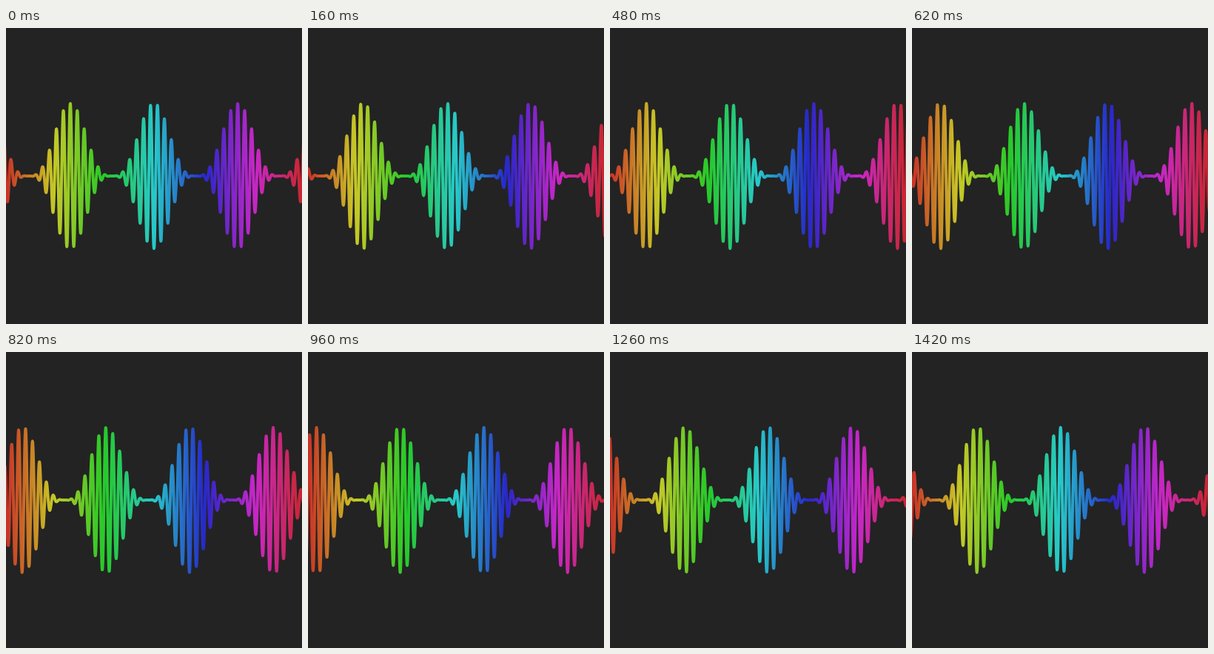
An HTML page with a canvas that plays this animation: 400 px wide and 400 px high, repeating every 1440 ms.

```html
<!DOCTYPE html>
<html lang="en">
<head>
<meta charset="utf-8">
<title>Rainbow wave packets</title>
<style>
  html, body { margin: 0; width: 100%; height: 100%; overflow: hidden; background: #232323; }
  canvas { display: block; width: 400px; height: 400px; }
</style>
</head>
<body>
<canvas id="stage" width="400" height="400"></canvas>
<script>
const SIZE = 400, MID = SIZE / 2;
const LOOP = 1440, STEP = 20;
const AMP = 98;
const PACKET = 36 * Math.PI;   // distance between packet centres
const RIPPLE = PACKET / 12;    // wavelength inside a packet

const ctx = document.getElementById('stage').getContext('2d');

const rainbow = ctx.createLinearGradient(0, 0, SIZE, 0);
for (let i = 0; i <= 48; i++) {
  const hue = 4 + 352 * i / 48;
  rainbow.addColorStop(i / 48, `hsl(${hue}, 68%, 47%)`);
}

// Packets drift left by one spacing per loop, ripples by six wavelengths.
function wave(x, p) {
  const envelope = Math.cos(Math.PI * ((x - MID) / PACKET + p)) ** 3;
  const ripple = Math.cos(2 * Math.PI * ((x - MID) / RIPPLE + 6 * p));
  return MID + AMP * envelope * ripple;
}

function draw(p) {
  ctx.fillStyle = '#232323';
  ctx.fillRect(0, 0, SIZE, SIZE);
  ctx.beginPath();
  for (let x = -4; x <= SIZE + 4; x += 0.25) ctx.lineTo(x, wave(x, p));
  ctx.strokeStyle = rainbow;
  ctx.lineWidth = 4;
  ctx.lineJoin = 'round';
  ctx.stroke();
}

const start = performance.now();
function tick() {
  const t = (performance.now() - start) % LOOP;
  draw(Math.floor(t / STEP) * STEP / LOOP);
  requestAnimationFrame(tick);
}
tick();
</script>
</body>
</html>
```
